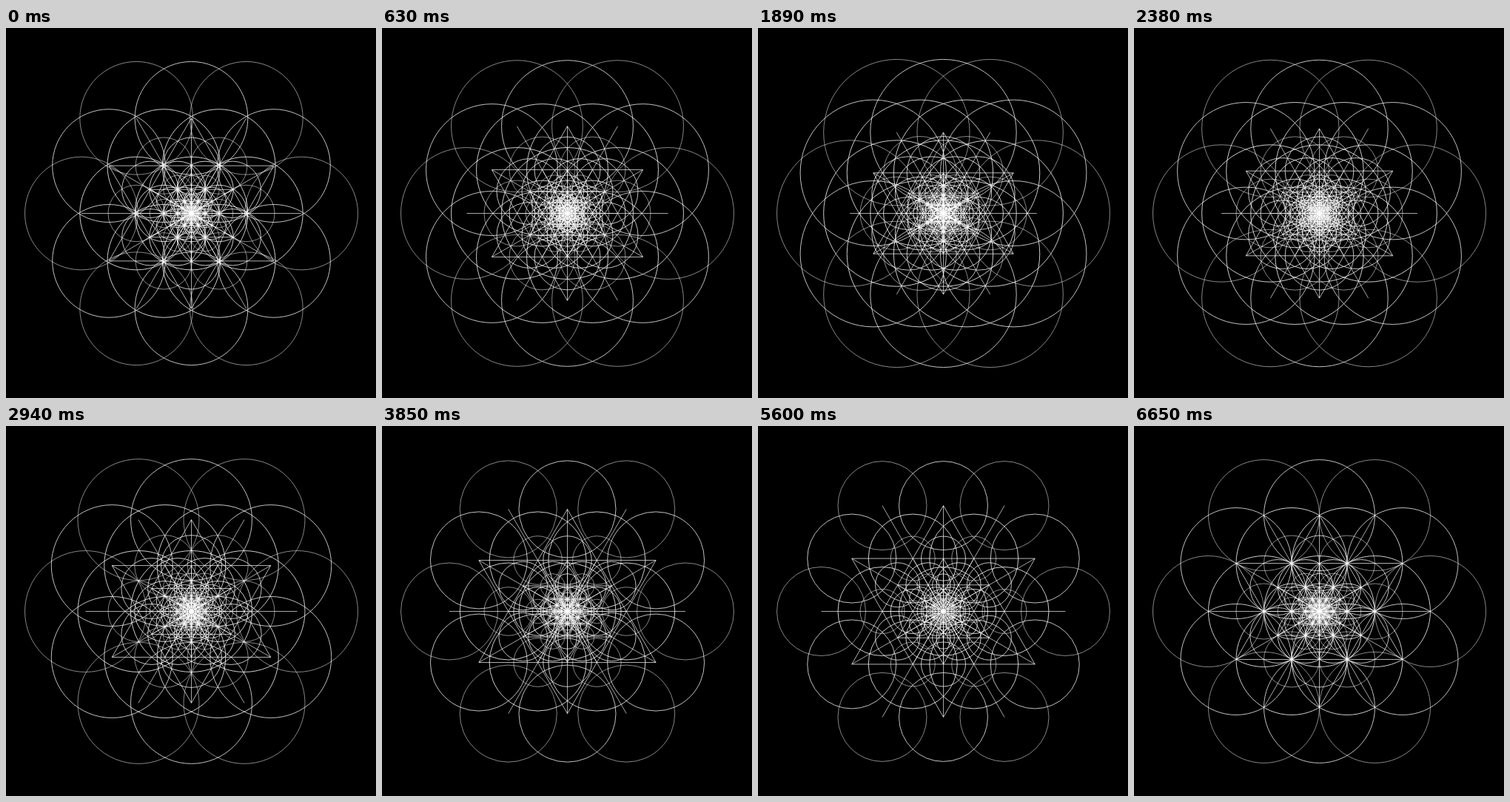
An HTML page with a canvas for the animation above (6.72 s loop, 500 by 500 pixels).

```html
<!DOCTYPE html>
<html lang="en">
<head>
<meta charset="utf-8">
<title>Breathing flower</title>
<style>
  html, body { margin: 0; width: 100%; height: 100%; overflow: hidden; background: #000; }
  canvas { display: block; width: 500px; height: 500px; }
</style>
</head>
<body>
<canvas id="stage" width="500" height="500"></canvas>
<script>
const ctx = document.getElementById('stage').getContext('2d');
const STEP = 70, STEPS = 96, LAYERS = 4, EXTENT = 225;
const CENTRE = 250.5;
const ROOT3 = Math.sqrt(3);

const polar = (dist, deg) => {
  const a = deg * Math.PI / 180;
  return [dist * Math.cos(a), dist * Math.sin(a)];
};

function stroke(alpha, trace) {
  ctx.beginPath();
  trace();
  ctx.strokeStyle = `rgba(255,255,255,${alpha})`;
  ctx.stroke();
}

// Six circles around the middle, each with its own stroke so overlaps add up.
function ring(dist, r, turn, alpha) {
  for (let k = 0; k < 6; k++) {
    const [x, y] = polar(dist, turn + 60 * k);
    stroke(alpha, () => ctx.arc(x, y, r, 0, 2 * Math.PI));
  }
}

function line(a, b, alpha) {
  stroke(alpha, () => { ctx.moveTo(...a); ctx.lineTo(...b); });
}

function flower(d, r) {
  stroke(.8, () => ctx.arc(0, 0, r, 0, 2 * Math.PI));
  ring(d, r, 0, .8);
  ring(ROOT3 * d, r, 30, .75);
  ring(2 * d, r, 0, .52);
  for (let k = 0; k < 3; k++) {
    line(polar(2 * d, 60 * k), polar(-2 * d, 60 * k), .65);
    line(polar(ROOT3 * d, 30 + 60 * k), polar(-ROOT3 * d, 30 + 60 * k), .65);
  }
  for (let k = 0; k < 6; k++) {
    line(polar(ROOT3 * d, 30 + 60 * k), polar(ROOT3 * d, 150 + 60 * k), .7);
  }
}

function draw(step) {
  const s = Math.sin(2 * Math.PI * (step + 1) / STEPS);
  // Spacing and radius trade off while the outer extent stays fixed.
  const d = EXTENT / 3 * (1 - .305 * s) / (1 - .168 * s);
  const r = EXTENT - 2 * d;
  ctx.setTransform(1, 0, 0, 1, 0, 0);
  ctx.fillStyle = '#000';
  ctx.fillRect(0, 0, 500, 500);
  ctx.translate(CENTRE, CENTRE);
  ctx.lineWidth = 1;
  for (let i = 0; i < LAYERS; i++) flower(d / 2 ** i, r / 2 ** i);
}

const start = performance.now();
let shown = -1;
function tick() {
  const step = Math.floor((performance.now() - start) / STEP) % STEPS;
  if (step !== shown) draw(shown = step);
  requestAnimationFrame(tick);
}
tick();
</script>
</body>
</html>
```
